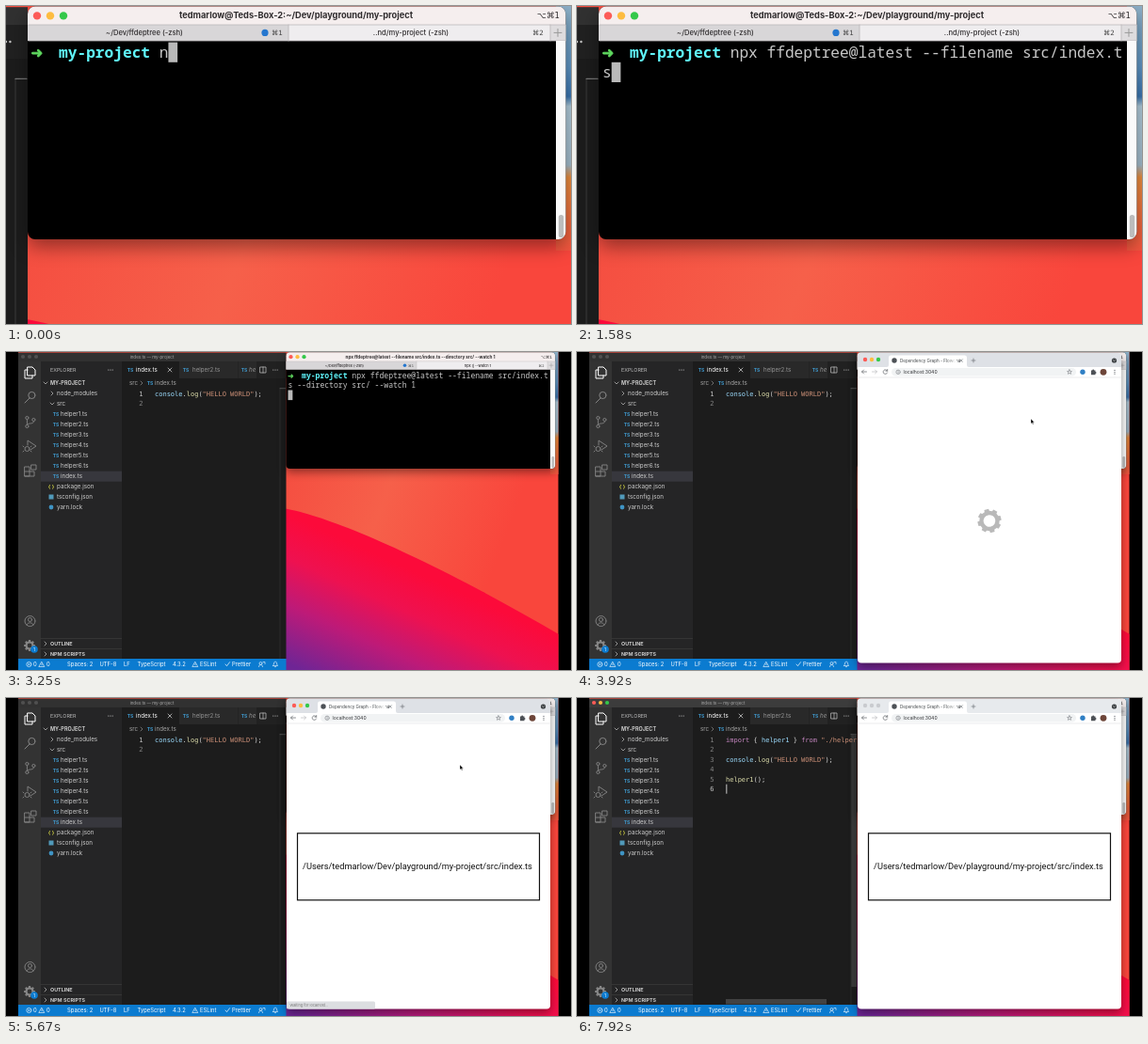
An HTML page that plays this animation: 600 by 338 pixels, repeating every 8 s.

```html
<!DOCTYPE html>
<html lang="en">
<head>
<meta charset="utf-8">
<title>Dependency graph demo</title>
<style>
  html, body { margin: 0; width: 100%; height: 100%; overflow: hidden; background: #000; }
  svg { display: block; width: 100vw; height: 100vh; }
  text { white-space: pre; font-family: Inter, sans-serif; }
  .code { font-family: "DejaVu Sans Mono", monospace; }
  .shell { font-family: "Noto Sans Mono", monospace; font-weight: 500; }
  .symbol { font-family: "DejaVu Sans", sans-serif; }
  .node { font-family: Roboto, sans-serif; }
  .window { filter: drop-shadow(0 4px 5px #0006); }
  .line { fill: none; stroke-linecap: round; stroke-linejoin: round; }
</style>
</head>
<body>
<svg id="stage" viewBox="0 0 600 338">
  <defs>
    <linearGradient id="hills" gradientUnits="userSpaceOnUse" x1="300" y1="130" x2="580" y2="235">
      <stop stop-color="#f54f41"/><stop offset=".35" stop-color="#f6604a"/><stop offset=".8" stop-color="#f9463c"/>
    </linearGradient>
    <linearGradient id="valley" gradientUnits="userSpaceOnUse" x1="400" y1="190" x2="330" y2="345">
      <stop offset=".15" stop-color="#fc0a3a"/><stop offset=".4" stop-color="#ee1150"/>
      <stop offset=".67" stop-color="#bd1a78"/><stop offset="1" stop-color="#6f2595"/>
    </linearGradient>
    <linearGradient id="sky" gradientUnits="userSpaceOnUse" x1="0" y1="0" x2="0" y2="130">
      <stop stop-color="#8fb2c9"/><stop offset=".25" stop-color="#5f98c8"/><stop offset=".37" stop-color="#3b78b5"/>
      <stop offset=".41" stop-color="#b4d0e0"/><stop offset=".65" stop-color="#a5bfd0"/>
      <stop offset=".7" stop-color="#f0913f"/><stop offset="1" stop-color="#f4553f"/>
    </linearGradient>
    <linearGradient id="tabFade" gradientUnits="userSpaceOnUse" x1="392" y1="0" x2="403" y2="0">
      <stop stop-color="#fff" stop-opacity="0"/><stop offset="1" stop-color="#fff"/>
    </linearGradient>
    <clipPath id="desktop"><rect x="13" width="573.5" height="338"/></clipPath>
    <clipPath id="editorClip"><rect x="123" width="174" height="338"/></clipPath>
  </defs>
  <g id="camera"></g>
</svg>
<script>
const USER = 'tedmarlow';
const COMMAND = 'npx ffdeptree@latest --filename src/index.ts --directory src/ --watch 1';
const LOOP = 8000, FPS = 12;
const TYPING = [[0, 1], [1580, 44], [2750, 70], [3080, 71]];
const ENTER = 3170, BROWSER_OPEN = 3500, GRAPH_READY = 4400;
const POINTER_MOVE = 5900, EDITOR_FOCUS = 6200, NEW_LINE = 6400, IMPORT_ADDED = 7100, LAST_ENTER = 7580;
const SHELL = { x: 299.5, y: 27.6, cell: 4.848, row: 10.6, columns: 57, prefix: 14 };
const CODE = { x: 158, y: 46.5, row: 10.5 };
const LIGHTS = ['#fc5b57', '#fdbc40', '#34c84a'];

const $ = id => document.getElementById(id);
const text = (x, y, content, size, fill, attrs = '') =>
  `<text x="${x}" y="${y}" font-size="${size}" fill="${fill}" ${attrs}>${content}</text>`;
const rect = (x, y, w, h, fill, attrs = '') =>
  `<rect x="${x}" y="${y}" width="${w}" height="${h}" fill="${fill}" ${attrs}/>`;
const circle = (x, y, r, fill, attrs = '') => `<circle cx="${x}" cy="${y}" r="${r}" fill="${fill}" ${attrs}/>`;
const line = (d, stroke, width = .7, attrs = '') =>
  `<path class="line" d="${d}" stroke="${stroke}" stroke-width="${width}" ${attrs}/>`;
const dots = (x, y, dx, dy, r, fill) =>
  [-1, 0, 1].map(i => circle(x + i * dx, y + i * dy, r, fill)).join('');
const lights = (id, x, y, r) =>
  `<g id="${id}">${LIGHTS.map((c, i) => circle(x + i * 7, y, r, c)).join('')}</g>`;
const tsIcon = (x, y) => text(x, y, 'TS', 5, '#3f9bd0', 'font-weight="700" text-anchor="middle"');
const down = (x, y) => line(`M${x - 2} ${y - 1}l2 2 2-2`, '#c5c5c5');
const right = (x, y) => line(`M${x - 1} ${y - 2}l2 2-2 2`, '#c5c5c5');
const MIDDLE = ' text-anchor="middle" ', BOLD = ' font-weight="700" ', MEDIUM = ' font-weight="500" ';

function gearPath(teeth, outer, inner, hole) {
  const step = 2 * Math.PI / teeth, points = [];
  for (let i = 0; i < teeth; i++)
    for (const [r, offset] of [[inner, -.31], [outer, -.24], [outer, .24], [inner, .31]]) {
      const a = (i + offset) * step;
      points.push(`${(r * Math.cos(a)).toFixed(2)} ${(r * Math.sin(a)).toFixed(2)}`);
    }
  return `M${points.join('L')}ZM${hole} 0A${hole} ${hole} 0 1 0 ${-hole} 0A${hole} ${hole} 0 1 0 ${hole} 0Z`;
}

const wallpaper = rect(13, 0, 574, 338, 'url(#hills)') +
  '<path d="M297 166.500C340 174 440 214 587 300V338H290V165Z" fill="url(#valley)"/>' +
  rect(578, 0, 9, 130, 'url(#sky)');

function activityBar() {
  const gray = '#868686';
  return rect(13, 10, 24, 316, '#333') +
    line('M23 16h5l3 3v6h-8zM23 19h-3v9h8v-3', '#fff', 1) +
    line('M31 46a3.6 3.6 0 1 1-7.2 0a3.6 3.6 0 1 1 7.2 0M25 49l-5 5', gray, 1) +
    line('M24 70a1.6 1.6 0 1 1-3.2 0a1.6 1.6 0 1 1 3.2 0M24 79a1.6 1.6 0 1 1-3.2 0a1.6 1.6 0 1 1 3.2 0M31 72a1.6 1.6 0 1 1-3.2 0a1.6 1.6 0 1 1 3.2 0M22.4 72v5M29.4 74c0 3-5 1-6.5 3', gray, .9) +
    line('M23 99v-5l9 6-6 4M25 103a2.5 2.5 0 1 0-5 0a2.5 2.5 0 1 0 5 0M19 101l-1-1M26 101l1-1M19 105l-1 1M26 105l1 1', gray, .9) +
    line('M20 122h5v10h-5zM20 127h10v5h-10M27 120h5v5h-5z', gray, .9) +
    line('M31 286a5.5 5.5 0 1 0-11 0a5.5 5.5 0 1 0 11 0M27.5 284.5a2 2 0 1 0-4 0a2 2 0 1 0 4 0M22 290c1-3 6-3 7 0', gray, .9) +
    `<path d="${gearPath(8, 6, 4.6, 2.4)}" fill="${gray}" fill-rule="evenodd" transform="translate(25 312)"/>` +
    circle(30, 316, 3.8, '#0b7bd0') + text(30, 317.7, '1', 4.6, '#fff', MIDDLE);
}

function sidebar() {
  const ink = '#ccc', size = 6.25;
  const row = i => 46.3 + 11 * i;
  const helpers = [1, 2, 3, 4, 5, 6].map(n => `helper${n}.ts`);
  const sources = [...helpers, 'index.ts'].map((name, i) =>
    tsIcon(53, row(i + 2) - .3) + text(58, row(i + 2), name, size, ink)).join('');
  return rect(37, 10, 86, 316, '#252526') + rect(37, 126.7, 86, 11, '#37373d') +
    text(47, 21, 'EXPLORER', 5.4, '#bbb') + dots(111, 19, 2.2, 0, .6, ink) +
    down(42, 33) + text(47, 35.3, 'MY-PROJECT', 5.5, ink, BOLD) +
    right(49, 44) + text(54, row(0), 'node_modules', size, ink) +
    down(49, 55) + text(54, row(1), 'src', size, ink) + sources +
    text(48, row(9) - .4, '{ }', 5.5, '#cbcb41', MIDDLE + BOLD) + text(54, row(9), 'package.json', size, ink) +
    rect(45.5, 151.5, 5, 5, '#519aba') + text(54, row(10), 'tsconfig.json', size, ink) +
    circle(48, 165, 2.4, '#3f94c4') + text(54, row(11), 'yarn.lock', size, ink) +
    line('M37 304.5h86M37 315.5h86', '#444', .5) +
    right(42, 310) + text(47, 312, 'OUTLINE', 5.4, ink, BOLD) +
    right(42, 321) + text(47, 323, 'NPM SCRIPTS', 5.4, ink, BOLD);
}

function editor() {
  return rect(123, 10, 174.5, 316, '#1c1c1c') + rect(184, 10, 82, 18, '#292929') +
    rect(266, 10, 31.5, 18, '#212121') + rect(246, 10, .6, 18, '#222') +
    tsIcon(132, 21) + text(138, 21.2, 'index.ts', 6.2, '#fff') + line('M172 17l4 4M176 17l-4 4', '#ddd') +
    tsIcon(191, 21) + text(198, 21.2, 'helper2.ts', 6.2, '#969696') +
    tsIcon(253, 21) + text(258, 21.2, 'he', 6.2, '#969696', 'font-style="italic"') +
    line('M270 16h6v6h-6zM273 16v6', '#c5c5c5') + dots(286, 19, 2.2, 0, .6, '#c5c5c5') +
    text(131, 35.2, 'src', 6.2, '#a5a5a5') + line('M143 31l2 2-2 2', '#a5a5a5', .6) +
    tsIcon(153, 35) + text(158, 35.2, 'index.ts', 6.2, '#a5a5a5') +
    line('M291 38.7V326', '#3a3a3a', .5) + line('M291 38.7H297', '#777', .6) +
    `<g id="scrollbars">${rect(291.3, 39, 5.7, 268, '#3a3a3a') + rect(158, 320, 107, 5.5, '#424242')}</g>` +
    '<g id="code" clip-path="url(#editorClip)"></g>';
}

function statusBar() {
  const item = (x, label) => text(x, 334.1, label, 5.85, '#fff');
  return rect(13, 326, 284.5, 12, '#0b7bd0') +
    line('M27 332a2.6 2.6 0 1 0-5.2 0a2.6 2.6 0 1 0 5.2 0M23.4 331l2 2M25.4 331l-2 2M38 329.5l2.8 5h-5.6zM38 331.3v1.5', '#fff', .6) +
    item(29, '0') + item(43, '0') + item(65, 'Spaces: 2') + item(99.5, 'UTF-8') + item(125, 'LF') +
    item(139.5, 'TypeScript') + item(177, '4.3.2') +
    line('M201 329.5l2.8 5h-5.6zM201 331.3v1.5', '#fff', .6) + item(206, 'ESLint') +
    line('M233 332l1.5 1.7 3-4', '#fff') + item(240, 'Prettier') +
    line('M268.5 334.5c0-3 4-3 4 0M272 331a1.5 1.5 0 1 0-3 0a1.5 1.5 0 1 0 3 0M273 329.5h2v2M283.5 333.5h5l-.8-1.5c0-4-3.4-4-3.4 0zM285.5 334.6h1', '#fff', .6);
}

function codeWindow() {
  return `<g>${rect(13, .6, 284.5, 9.6, '#333', 'id="codeTitle"')}` +
    '<g id="codeDim">' + dots(25, 5, 7, 0, 2.1, '#505050') + '</g>' + lights('codeLights', 18, 5, 2.1) +
    text(155, 7, 'index.ts — my-project', 4.5, '#aaa', MIDDLE) +
    activityBar() + sidebar() + editor() + statusBar() + '</g>';
}

function terminalWindow() {
  const ink = '#2f2c2e', dim = '#444';
  return '<g class="window">' + rect(297.5, .2, 285.7, 123.8, '#000', 'rx="4"') +
    '<path d="M297.5 18.5V4.2a4 4 0 0 1 4-4h277.700a4 4 0 0 1 4 4v14.300z" fill="#f5eeee"/>' +
    rect(297.5, 10, 138.5, 8.5, '#d8d6d8') + rect(436, 10, 139, 8.5, '#efedef') + rect(575, 10, 8.2, 8.5, '#dedcde') +
    line('M298 10h285M436 10v8.5M575 10v8.5M298 18.5h285', '#bab7b9', .4) +
    '<path d="M578 18.5h5.2V120a4 4 0 0 1-4 4H578z" fill="#fafafa"/>' + rect(579.4, 111, 2.7, 12, '#bcbcbc', 'rx="1.3"') +
    lights('terminalLights', 302.5, 5.2, 2.1) +
    text(440, 6.7, '', 4.62, ink, MIDDLE + BOLD + 'id="terminalTitle"') +
    text(580, 6.6, '⌥⌘1', 4.3, ink, 'class="symbol" text-anchor="end"') +
    text(359.5, 15.6, '~/Dev/ffdeptree (-zsh)', 3.8, ink, MIDDLE + MEDIUM) + circle(423.5, 14.2, 1.8, '#2577cf') +
    text(430, 15.6, '⌘1', 3.6, dim, 'class="symbol"' + MIDDLE) +
    text(501, 15.6, '', 3.8, ink, MIDDLE + MEDIUM + 'id="terminalTab"') +
    text(568.5, 15.6, '⌘2', 3.6, dim, 'class="symbol"' + MIDDLE) +
    line('M577 14.2h4M579 12.2v4', '#999', .5) +
    text(SHELL.x - .3, SHELL.y, '➜', 7.6, '#5fd75f', 'class="symbol" stroke="#5fd75f" stroke-width=".4"') +
    text(SHELL.x + 3 * SHELL.cell, SHELL.y, 'my-project', 8.08, '#5ff5fb', 'class="shell" style="font-weight:700"') +
    text(SHELL.x + SHELL.prefix * SHELL.cell, SHELL.y, '', 8.08, '#c7c7c7', 'class="shell" id="shell0"') +
    text(SHELL.x, SHELL.y + SHELL.row, '', 8.08, '#c7c7c7', 'class="shell" id="shell1"') +
    rect(0, 0, SHELL.cell, 10.6, '#b9b9b9', 'id="shellCursor"') + '</g>';
}

function browserWindow() {
  const ink = '#5f6368';
  return '<g id="browser" class="window">' + rect(298, 1, 280, 329.5, '#fff', 'rx="4"') +
    '<path id="tabStrip" d="M298 16V5a4 4 0 0 1 4-4h272a4 4 0 0 1 4 4v11z" fill="#dee1e6"/>' +
    '<g id="browserDim">' + dots(313, 8, 7, 0, 2.2, '#c9cbcf') + '</g>' + lights('browserLights', 306, 8, 2.2) +
    '<path d="M329 16q2 0 2-2V6q0-2.5 2.5-2.5h78q2.5 0 2.5 2.5v8q0 2 2 2z" fill="#fff"/>' +
    circle(337, 9, 2.7, '#4d5156') +
    text(343, 10.9, 'Dependency Graph - Flowcha', 4.55, '#3c4043') + rect(392, 5, 11, 9, 'url(#tabFade)') +
    line('M406.8 7.8l2.6 2.6M409.4 7.8l-2.6 2.6M419 9h4M421 7v4', ink, .6) +
    circle(570.5, 9, 2.6, '#3c4043') + line('M569.4 8.6l1.1 1.1 1.1-1.1', '#fff', .5) +
    rect(334, 17, 196, 8.6, '#f1f3f4', 'rx="4.3"') + line('M298 27h280', '#d5d7da', .5) +
    line('M307.5 21h-5M304.5 19l-2 2 2 2', ink) + line('M313.5 21h5M316.5 19l2 2-2 2', '#b9bbbe') +
    line('M329.5 20a2.3 2.3 0 1 0 .1 2M329.7 18.5v1.7h-1.7', ink) +
    line('M343.3 21.3a2.2 2.2 0 1 0-4.4 0a2.2 2.2 0 1 0 4.4 0M341.1 21v1.4M341.1 20v.1', ink, .5) +
    text(346.5, 23.1, 'localhost:3040', 5.1, '#303134') +
    line('M523 18.8l.7 1.6 1.7.1-1.3 1.1.4 1.7-1.5-.9-1.5.9.4-1.7-1.3-1.1 1.7-.1z', ink, .5) +
    circle(537, 21.3, 2.7, '#2f7fc4') +
    '<path d="M546 19.5h1.2a1 1 0 0 1 2 0h1.3v1.5a1 1 0 0 1 0 2v1.2H546z" fill="#4d5156"/>' +
    circle(559, 21.3, 3.4, '#6d4539') + dots(571, 21.3, 0, 1.9, .6, ink) +
    `<path id="gear" d="${gearPath(8, 12.8, 10.7, 6.3)}" fill="#b9b9b9" fill-rule="evenodd"/>` +
    '<g id="graph">' + rect(309.5, 143.8, 257, 71, '#fff', 'stroke="#111" stroke-width="1.2"') +
    text(437, 182, `/Users/${USER}/Dev/playground/my-project/src/index.ts`, 9.25, '#111', 'class="node"' + MIDDLE) + '</g>' +
    '<g id="waiting">' + rect(298, 322.5, 94, 8, '#dcdee1', 'rx="1.5"') +
    text(301.5, 328, 'Waiting for localhost...', 3.9, '#777') + '</g></g>';
}

const pointer = '<path id="pointer" d="M0 0V5.2L1.2 4.1 2 6 2.9 5.6 2.1 3.8H3.7Z" fill="#000" stroke="#fff" stroke-width=".35"/>';

$('camera').innerHTML = `<g clip-path="url(#desktop)">${wallpaper + codeWindow() + terminalWindow() + browserWindow() + pointer}</g>`;

const clamp = v => Math.max(0, Math.min(1, v));
const smooth = v => (v = clamp(v)) * v * (3 - 2 * v);
const show = (id, visible) => $(id).style.display = visible ? '' : 'none';
const move = (id, x, y, extra = '') => $(id).setAttribute('transform', `translate(${x} ${y})${extra}`);

function typedCount(t) {
  let count = TYPING[0][1];
  for (let i = 1; i < TYPING.length; i++) {
    const [t0, n0] = TYPING[i - 1], [t1, n1] = TYPING[i];
    if (t >= t0) count = n0 + (n1 - n0) * clamp((t - t0) / (t1 - t0));
  }
  return Math.floor(count + .01);
}

function drawShell(t) {
  const typed = COMMAND.slice(0, typedCount(t)), room = SHELL.columns - SHELL.prefix;
  const entered = t >= ENTER, end = SHELL.prefix + typed.length;
  $('shell0').textContent = typed.slice(0, room);
  $('shell1').textContent = typed.slice(room);
  const row = entered ? 2 : Math.floor(end / SHELL.columns), column = entered ? 0 : end % SHELL.columns;
  move('shellCursor', SHELL.x + column * SHELL.cell, 19.3 + row * SHELL.row);
  $('terminalTitle').textContent = entered ? COMMAND : `${USER}@Teds-Box-2:~/Dev/playground/my-project`;
  $('terminalTab').textContent = entered ? 'npx (j --watch 1' : '..nd/my-project (-zsh)';
}

const paint = (...tokens) => tokens.map(([c, s]) => `<tspan fill="${c}">${s}</tspan>`).join('');
const PLAIN = '#d4d4d4', NAME = '#9cdcfe', CALL = '#dcdcaa', STRING = '#ce9178', KEYWORD = '#c586c0';
const LOG_LINE = paint([NAME, 'console'], [PLAIN, '.'], [CALL, 'log'], [PLAIN, '('], [STRING, '"HELLO WORLD"'], [PLAIN, ');']);
const IMPORT_LINE = paint([KEYWORD, 'import'], [PLAIN, ' { '], [NAME, 'helper1'], [PLAIN, ' } '], [KEYWORD, 'from'], [STRING, ' "./helper1";']);

function drawCode(t) {
  const imported = t >= IMPORT_ADDED, lines = [LOG_LINE, ''];
  const name = 'helper1'.slice(0, Math.floor(7 * clamp((t - NEW_LINE) / 600)));
  const call = '();'.slice(0, Math.floor(3 * clamp((t - IMPORT_ADDED) / 350)));
  let column = 0;
  if (t >= NEW_LINE) {
    lines.push(paint([CALL, name], [PLAIN, call]));
    column = name.length + call.length;
  }
  if (imported) lines.unshift(IMPORT_LINE, '');
  if (t >= LAST_ENTER) { lines.push(''); column = 0; }
  const focused = t >= EDITOR_FOCUS, active = focused ? lines.length - 1 : 0;
  const caret = focused ? rect(CODE.x + .4 + column * 4.214, 39.2 + active * CODE.row, .9, 10, '#ddd') : '';
  $('code').innerHTML = lines.map((content, i) => {
    const y = CODE.y + i * CODE.row;
    return text(145.5, y, i + 1, 7, i === active ? '#c6c6c6' : '#858585', 'class="code" text-anchor="end"') +
      text(CODE.x, y, content, 7, PLAIN, 'class="code"');
  }).join('') + caret;
  show('scrollbars', imported);
}

function draw(t) {
  const scale = 2 - smooth((t - 2500) / 650);
  $('camera').setAttribute('transform', `matrix(${scale} 0 0 ${scale} ${572 * (1 - scale)} 0)`);
  drawShell(t);
  drawCode(t);

  const focused = t >= EDITOR_FOCUS;
  show('codeLights', focused);
  show('codeDim', !focused);
  show('browserLights', !focused);
  show('browserDim', focused);
  $('codeTitle').setAttribute('fill', focused ? '#3c3c3c' : '#313131');
  $('tabStrip').setAttribute('fill', focused ? '#e7eaed' : '#dee1e6');

  const open = t >= BROWSER_OPEN, ready = t >= GRAPH_READY;
  show('browser', open);
  show('gear', !ready);
  show('graph', ready);
  show('waiting', ready && !focused);
  move('gear', 438, 179.5, ` rotate(${(t - BROWSER_OPEN) * .18})`);

  const travel = smooth((t - POINTER_MOVE) / (EDITOR_FOCUS - POINTER_MOVE));
  show('pointer', open && t < NEW_LINE);
  move('pointer', 482 - 292 * travel, 71 + 19 * travel);
}

function tick(now) {
  // Hold each pose like a 12 fps recording.
  const step = Math.floor((now % LOOP + 5) * FPS / 1000) % (LOOP * FPS / 1000);
  draw(step * 1000 / FPS);
  requestAnimationFrame(tick);
}
tick(0);
</script>
</body>
</html>
```
